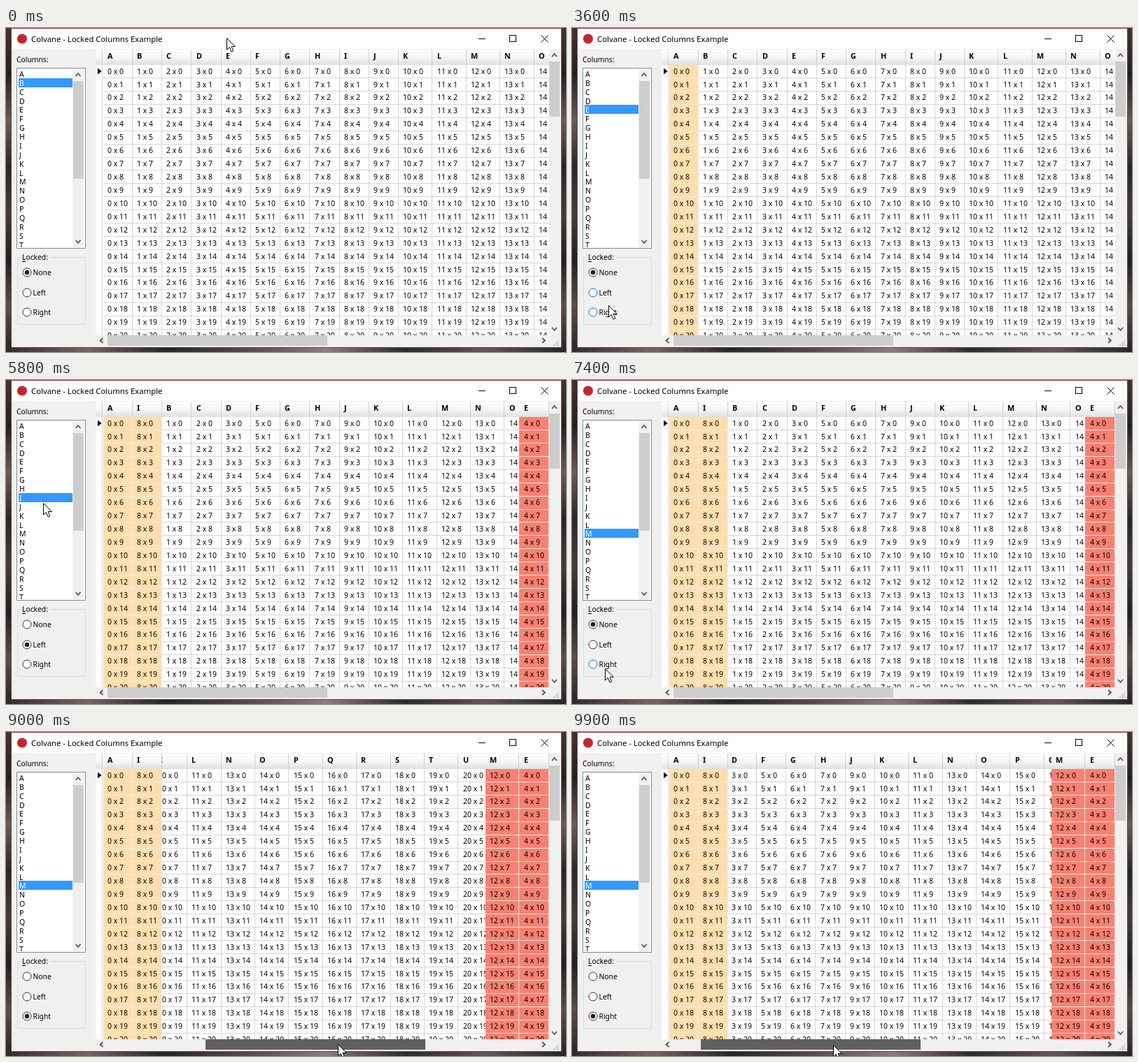
Recreate the animation shown at these times as an HTML page with a canvas. Size 800 px wide and 464 px high, loop 10 s.

```html
<!DOCTYPE html>
<html lang="en">
<head>
<meta charset="utf-8">
<title>Locked Columns Example</title>
<style>
html, body { margin: 0; width: 100%; height: 100%; overflow: hidden; background: #2b2423; }
canvas { display: block; }
</style>
</head>
<body>
<canvas id="stage" width="800" height="464"></canvas>
<script>
const ctx = document.getElementById('stage').getContext('2d');
const LOOP = 10000, TICK = 100;
const SANS = '"Noto Sans", "Open Sans", sans-serif';
const LETTERS = 'ABCDEFGHIJKLMNOPQRSTUVWXYZ';
const GRID = { left: 138.5, right: 775.5, top: 31, body: 53, bottom: 440, row: 18.93 };
const RADIOS = [['None', 350], ['Left', 379], ['Right', 407]];
const DRAG_START = 83, GRAB_X = 334;

// Pointer keys: tick, x, y
const POINTER = [
  [0, 315, 14], [2, 315, 14], [5, 60, 133], [6, 52, 88], [8, 50, 80], [11, 32, 63],
  [12, 32, 63], [13, 22, 205], [14, 22, 205], [16, 48, 338], [21, 34, 374], [23, 34, 374],
  [26, 52, 140], [29, 50, 115], [32, 50, 115], [34, 80, 270], [36, 52, 397], [39, 44, 402],
  [42, 44, 402], [44, 60, 200], [46, 52, 167], [48, 100, 330], [49, 100, 330], [51, 36, 378],
  [54, 34, 378], [56, 45, 362], [58, 53, 176], [61, 48, 217], [64, 48, 218], [66, 52, 372],
  [68, 53, 400], [71, 47, 413], [75, 47, 413], [76, 60, 443], [78, 130, 446], [80, 320, 447],
  [81, 334, 444], [82, 334, 444], [85, 413, 443], [87, 413, 443], [90, 474, 447],
  [91, 480, 447], [95, 420, 447], [97, 420, 447], [99, 373, 448]
];
const SELECTION = [[0, 'B'], [10, 'A'], [29, 'E'], [45, 'I'], [63, 'M']];
const CHECKED = [[0, 'None'], [21, 'Left'], [33, 'None'], [39, 'Right'], [48, 'None'],
  [53, 'Left'], [68, 'None'], [75, 'Right']];
const LOCKS = [[23, 'A', 'left'], [40, 'E', 'right'], [54, 'I', 'left'], [75, 'M', 'right']];

const current = (steps, tick) => steps.filter(s => s[0] <= tick).pop()[1];
const columnWidth = c => LETTERS.indexOf(c) < 10 ? 42.25 : 48.4;

function pointerAt(tick) {
  const i = POINTER.findIndex(k => k[0] >= tick);
  if (i <= 0) return { x: POINTER[0][1], y: POINTER[0][2] };
  const [t0, x0, y0] = POINTER[i - 1], [t1, x1, y1] = POINTER[i];
  const p = (tick - t0) / (t1 - t0);
  return { x: Math.round(x0 + (x1 - x0) * p), y: Math.round(y0 + (y1 - y0) * p) };
}

function rect(x, y, w, h, color) {
  ctx.fillStyle = color;
  ctx.fillRect(x, y, w, h);
}

function frame(x, y, w, h, color) {
  ctx.strokeStyle = color;
  ctx.lineWidth = 1;
  ctx.strokeRect(x + .5, y + .5, w - 1, h - 1);
}

function text(str, x, baseline, size = 10.3, color = '#000', weight = '') {
  ctx.font = `${weight} ${size}px ${SANS}`;
  ctx.fillStyle = color;
  ctx.fillText(str, x, baseline);
}

function line(points, color, width = 1) {
  ctx.beginPath();
  points.forEach(([x, y]) => ctx.lineTo(x, y));
  ctx.strokeStyle = color;
  ctx.lineWidth = width;
  ctx.stroke();
}

function disc(x, y, r, fill, stroke) {
  ctx.beginPath();
  ctx.arc(x, y, r, 0, 7);
  ctx.fillStyle = fill;
  ctx.fill();
  if (stroke) {
    ctx.strokeStyle = stroke;
    ctx.lineWidth = 1;
    ctx.stroke();
  }
}

function clipped(x, y, w, h, draw) {
  ctx.save();
  ctx.beginPath();
  ctx.rect(x, y, w, h);
  ctx.clip();
  draw();
  ctx.restore();
}

function gradient(x1, y1, colors, x0 = 0, y0 = 0) {
  const g = ctx.createLinearGradient(x0, y0, x1, y1);
  colors.forEach((c, i) => g.addColorStop(i / (colors.length - 1), c));
  return g;
}

function chevron(x, y, dx, dy) {
  const s = 3.5;
  line([[x - dx * 2 - dy * s, y - dy * 2 - dx * s], [x + dx * 2, y + dy * 2],
    [x - dx * 2 + dy * s, y - dy * 2 + dx * s]], '#505050', 1.7);
}

function drawWindow() {
  rect(0, 0, 800, 464, gradient(0, 464,
    ['#4a3030', '#262020', '#6b5a56', '#2d2626', '#463c3a', '#241f20', '#5a4c49', '#2a2424']));
  rect(0, 458, 800, 6, gradient(800, 458,
    ['#332b2a', '#75645f', '#2a2324', '#57494a', '#8b7c79', '#302829', '#625556', '#2a2324'], 0, 458));
  rect(7, 0, 787, 458, '#7f3b49');
  rect(8, 1, 785, 29, '#fff');
  rect(8, 30, 785, 427, '#f0f0f0');
  disc(23, 15.5, 7, '#c4262e');
  text('Colvane - Locked Columns Example', 36, 20, 11.3);
  line([[675, 15.5], [685, 15.5]], '#000');
  frame(719, 10, 10, 10, '#000');
  line([[764.5, 10.5], [774.5, 20.5]], '#000');
  line([[774.5, 10.5], [764.5, 20.5]], '#000');
}

function drawList(selected) {
  text('Columns:', 15, 49);
  rect(15, 57, 99, 259, '#fff');
  frame(15, 57, 99, 259, '#828790');
  clipped(16, 58, 97, 256, () => {
    [...LETTERS].slice(0, 20).forEach((c, i) => {
      const y = 59 + i * 12.87;
      if (c === selected) rect(18, Math.round(y), 77, 13, '#3399ff');
      text(c, 19, Math.round(y) + 11, 10.5, c === selected ? '#fff' : '#000');
    });
    rect(95, 59, 16, 256, '#f0f0f0');
    rect(96, 76, 15, 140, '#cdcdcd');
  });
  chevron(103, 67, 0, -1);
  chevron(103, 306, 0, 1);
}

function drawRadios(checked, pointer) {
  frame(16, 328, 98, 97, '#dcdcdc');
  rect(21, 322, 41, 13, '#f0f0f0');
  text('Locked:', 23, 332);
  line([[23, 334.5], [28, 334.5]], '#000');
  RADIOS.forEach(([name, y]) => {
    const hover = pointer.x > 22 && pointer.x < 70 && pointer.y >= y - 10 && pointer.y < y + 19;
    disc(30, y, 6, '#fff', hover ? '#0078d7' : '#333');
    if (name === checked) disc(30, y, 3.3, hover ? '#0078d7' : '#222');
    text(name, 38.5, y + 4.3);
  });
}

function drawColumn(name, x, fill) {
  const w = columnWidth(name), index = LETTERS.indexOf(name);
  const left = Math.round(x), edge = Math.round(x + w) - 1, textX = Math.round(x + 6.3);
  if (fill) rect(left, GRID.body, edge - left, GRID.bottom - GRID.body, fill);
  const rule = fill ? '#f3ebe2' : '#d6d6d6';
  rect(edge, GRID.body, 1, GRID.bottom - GRID.body, rule);
  rect(edge, GRID.top, 1, GRID.body - GRID.top, '#cfcfcf');
  clipped(left, GRID.top, edge - left, GRID.bottom - GRID.top, () => {
    text(name, textX, 44, 10.8, '#000', 'bold');
    for (let r = 0; r <= 20; r++) {
      const y = GRID.body + r * GRID.row;
      text(`${index} x ${r}`, textX, Math.round(y + 12.6), 10.5);
      rect(left, Math.round(y + GRID.row) - 1, edge - left, 1, rule);
    }
  });
}

function drawGrid(tick, scroll) {
  rect(128, GRID.top, 648, GRID.bottom - GRID.top, '#fff');
  rect(128, GRID.top, 648, GRID.body - GRID.top,
    gradient(0, GRID.body, ['#fff', '#f6f6f6', '#e0e0e0'], 0, GRID.top));
  rect(137, GRID.top, 1, GRID.bottom - GRID.top, '#d6d6d6');
  ctx.beginPath();
  ctx.moveTo(131, 57.5);
  ctx.lineTo(136.5, 62);
  ctx.lineTo(131, 66.5);
  ctx.fillStyle = '#000';
  ctx.fill();

  const locks = LOCKS.filter(l => l[0] <= tick);
  const locked = locks.map(l => l[1]);
  let left = GRID.left, right = GRID.right;
  clipped(138, GRID.top, 638, GRID.bottom - GRID.top, () => {
    for (const [, name, side] of locks) {
      const w = columnWidth(name);
      if (side === 'right') right -= w;
      drawColumn(name, side === 'left' ? left : right, side === 'left' ? '#ffdead' : '#fa8072');
      if (side === 'left') left += w;
    }
    const x0 = Math.round(left), x1 = Math.round(right);
    clipped(x0, GRID.top, x1 - x0, GRID.bottom - GRID.top, () => {
      let x = left - scroll;
      for (const name of LETTERS) {
        if (locked.includes(name)) continue;
        const w = columnWidth(name);
        if (x + w > left && x < right) drawColumn(name, x);
        x += w;
      }
    });
  });
}

function drawScrollbars(shift, pointer, dragging) {
  rect(776, 31, 16, 409, '#f0f0f0');
  rect(776, 48, 15, 79, '#cdcdcd');
  chevron(783.5, 39, 0, -1);
  chevron(783.5, 431, 0, 1);
  rect(128, 440, 664, 16, '#f0f0f0');
  const x = 145 + shift;
  const hover = pointer.y > 440 && pointer.x >= x && pointer.x < x + 314;
  rect(x, 440, 314, 15, dragging ? '#606060' : hover ? '#a6a6a6' : '#cdcdcd');
  chevron(136.5, 447.5, -1, 0);
  chevron(768, 447.5, 1, 0);
  for (let i = 0; i < 3; i++)
    for (let j = 0; j <= i; j++) rect(788 - j * 3, 447 + i * 3, 2, 2, '#bfbfbf');
}

function drawPointer({ x, y }) {
  const shape = [[0, 0], [0, 16.5], [3.8, 13], [6.5, 19.5], [9.3, 18.3], [6.6, 12], [11.8, 12]];
  ctx.beginPath();
  shape.forEach(([dx, dy]) => ctx.lineTo(x + .5 + dx, y + .5 + dy));
  ctx.closePath();
  ctx.fillStyle = '#fff';
  ctx.fill();
  ctx.strokeStyle = '#000';
  ctx.lineWidth = 1;
  ctx.stroke();
}

function render(ms) {
  let tick = Math.floor(ms % LOOP / TICK);
  if (tick > 2 && (tick - 3) % 5 === 4) tick--;
  const pointer = pointerAt(tick);
  const dragging = tick >= DRAG_START;
  const shift = dragging ? pointer.x - GRAB_X : 0;
  drawWindow();
  drawList(current(SELECTION, tick));
  drawRadios(current(CHECKED, tick), pointer);
  drawGrid(tick, Math.round(shift * 2.2));
  drawScrollbars(shift, pointer, dragging);
  drawPointer(pointer);
}

const start = performance.now();
function loop() {
  render(performance.now() - start);
  requestAnimationFrame(loop);
}
loop();
</script>
</body>
</html>
```
